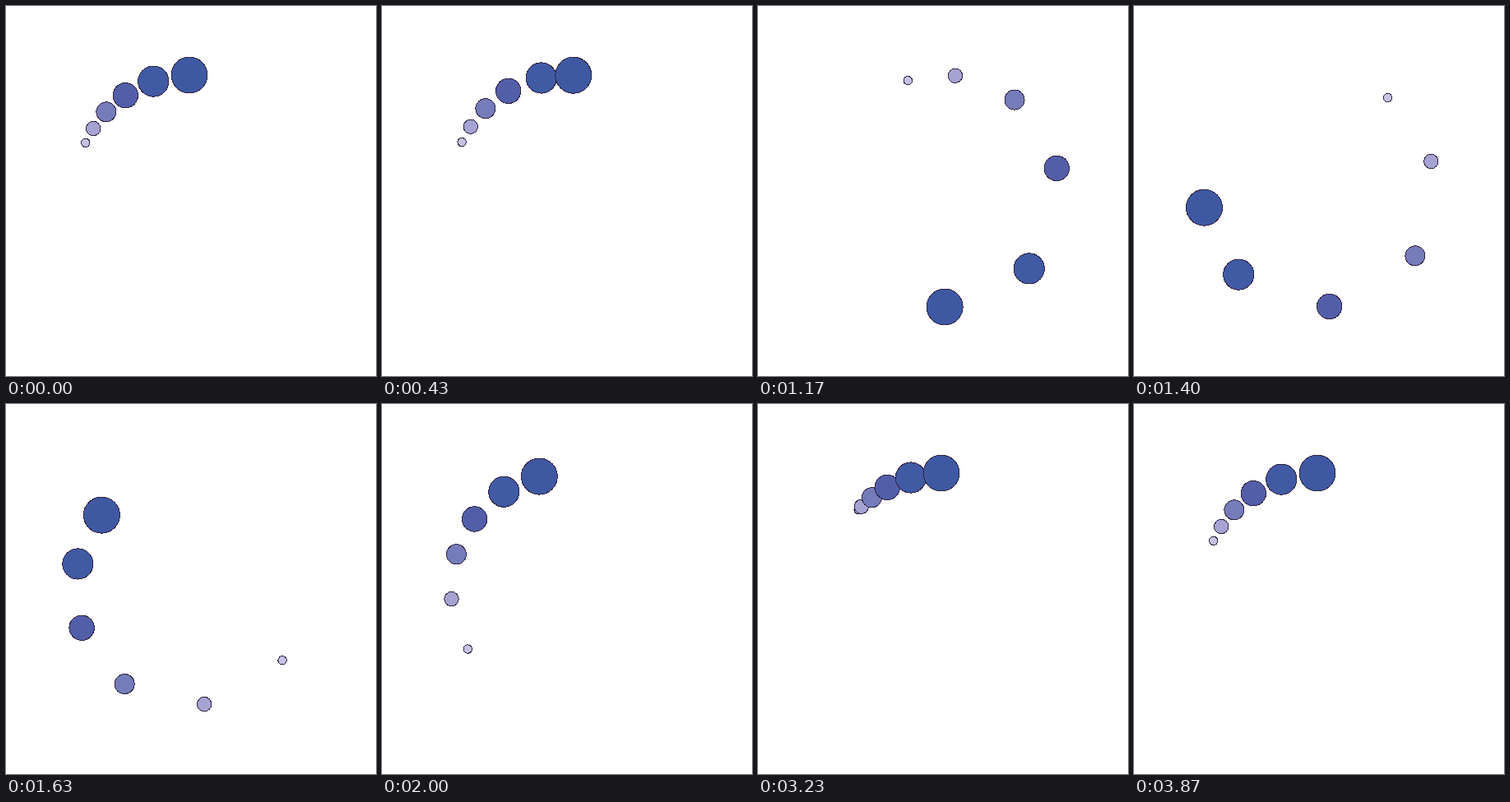
Write an HTML page that moves like this. It is 450 px wide and 450 px high and loops after 3.91 s.

```html
<!DOCTYPE html>
<html lang="en">
<head>
<meta charset="utf-8">
<title>Circling dots</title>
<style>
  html, body { margin: 0; width: 100%; height: 100%; overflow: hidden; background: #fff; }
  svg { display: block; width: 100vw; height: 100vh; }
  circle { stroke: #302242; stroke-width: 1; shape-rendering: crispEdges; }
</style>
</head>
<body>
<svg id="stage" viewBox="0 0 450 450"></svg>
<script>
const LOOP = 3910, FRAME = 100 / 3;
const CENTER = 225, RING = 141;

// Angles are degrees clockwise from the top.
// go: [start, duration, x1, x2] of the swing round to `peak`;
// back: [start, end] of the settling to a full turn.
const dots = [
  { r: 22,   fill: '#3e59a2', rest: -0.8,  peak: 360,   go: [236, 2262, .515, .249], back: [3200, 3700] },
  { r: 18.6, fill: '#405aa4', rest: -18.9, peak: 363.6, go: [145, 2422, .579, .293], back: [2950, 3870] },
  { r: 15.2, fill: '#525fa8', rest: -34.4, peak: 365.9, go: [175, 2472, .618, .303], back: [3150, 3830] },
  { r: 12,   fill: '#757cb9', rest: -47,   peak: 369.2, go: [223, 2538, .635, .301], back: [3200, 3740] },
  { r: 8.7,  fill: '#a5a3d1', rest: -57.4, peak: 372.8, go: [277, 2652, .641, .282], back: [3205, 3735] },
  { r: 5.2,  fill: '#c5c3e3', rest: -65.4, peak: 378.6, go: [346, 2843, .618, .247], back: [3220, 3730] }
];

const clamp = v => Math.min(1, Math.max(0, v));
const smooth = s => s * s * (3 - 2 * s);

// Cubic bezier easing with control points (x1, 0) and (x2, 1).
function ease(x, x1, x2) {
  let lo = 0, hi = 1;
  for (let i = 0; i < 24; i++) {
    const s = (lo + hi) / 2, u = 1 - s;
    if (3 * x1 * s * u * u + 3 * x2 * s * s * u + s * s * s < x) lo = s; else hi = s;
  }
  return smooth((lo + hi) / 2);
}

function turn({ peak, go: [start, time, x1, x2], back: [from, to] }, t) {
  if (t < start) return 0;
  const settle = smooth(clamp((t - from) / (to - from)));
  return peak * ease(clamp((t - start) / time), x1, x2) - (peak - 360) * settle;
}

const stage = document.getElementById('stage');
for (const dot of [...dots].reverse()) {
  dot.el = document.createElementNS('http://www.w3.org/2000/svg', 'circle');
  dot.el.setAttribute('r', dot.r);
  dot.el.setAttribute('fill', dot.fill);
  stage.append(dot.el);
}

function draw(t) {
  for (const dot of dots) {
    const a = (dot.rest + turn(dot, t)) * Math.PI / 180;
    dot.el.setAttribute('cx', (CENTER + RING * Math.sin(a)).toFixed(2));
    dot.el.setAttribute('cy', (CENTER - RING * Math.cos(a)).toFixed(2));
  }
}

const begin = performance.now();
function tick() {
  const t = (performance.now() - begin) % LOOP;
  draw(Math.floor(t / FRAME + 0.1001) * FRAME);
  requestAnimationFrame(tick);
}
draw(0);
requestAnimationFrame(tick);
</script>
</body>
</html>
```
